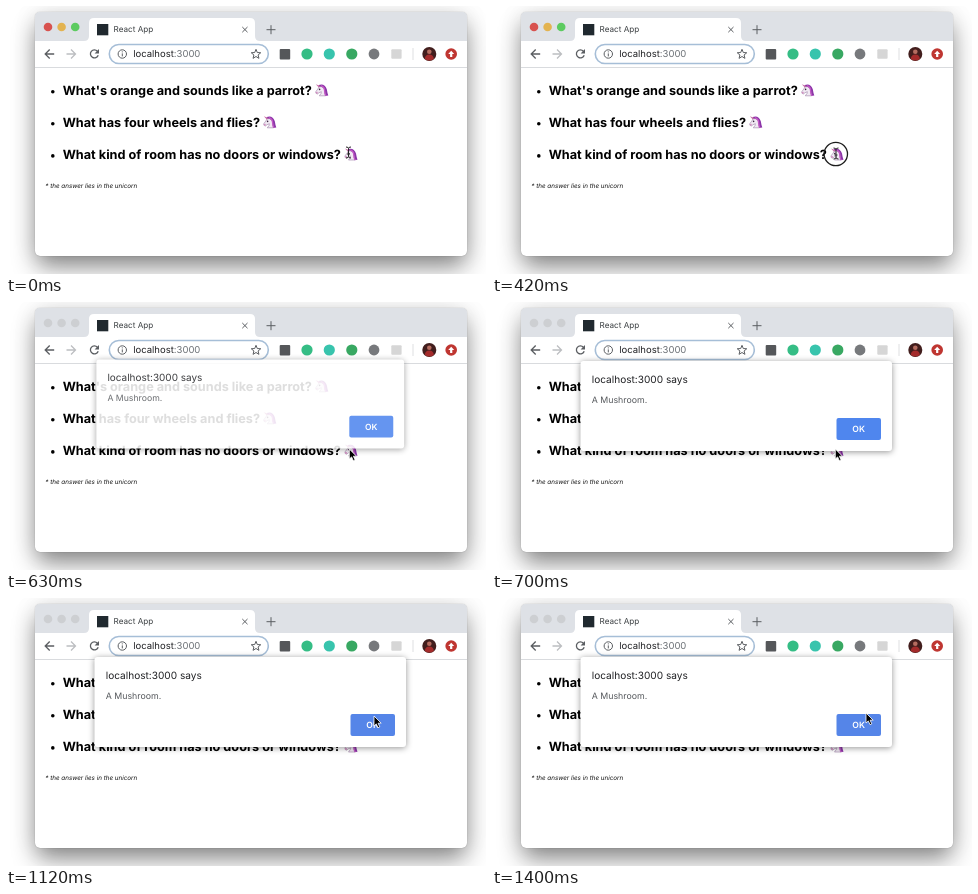
These frames come from a looping animation (480 px wide and 268 px high, 1470 ms). An HTML page:

```html
<!DOCTYPE html>
<html lang="en">
<head>
<meta charset="utf-8">
<title>Riddles</title>
<style>
  html, body { margin: 0; width: 100%; height: 100%; overflow: hidden; background: #fff; }
  #window {
    position: absolute; left: 29px; top: 6px; width: 432px; height: 244px;
    border-radius: 5px; background: #fff;
    box-shadow: 0 0 1px rgba(0,0,0,.4), 0 12px 24px -2px rgba(0,0,0,.48), 0 0 24px rgba(0,0,0,.08);
  }
  svg { position: absolute; left: 0; top: 0; width: 480px; height: 268px; display: block; }
  text { font-family: Inter, "Liberation Sans", sans-serif; text-rendering: geometricPrecision; white-space: pre; }
  .question { font-size: 12.7px; font-weight: 700; fill: #000; }
  .line { fill: none; stroke: #5b5e62; stroke-width: 1.3; }
  .thin { stroke-width: 1; }
  #dialog rect.panel { filter: drop-shadow(0 1.5px 3px rgba(0,0,0,.42)); }
</style>
</head>
<body>
<div id="window"></div>
<svg viewBox="0 0 480 268">
  <defs>
    <g id="unicorn">
      <path d="M-3-5.3Q3-7 5-1Q5.6 3 6.5 5.3L3 5.8Q3-1-3-3Z" fill="#8b35a8"/>
      <path d="M-2.5-3.5Q2-4 2.8 0Q3.5 3 3.5 5.6H-2.5Q0 3-.5 1.5Q-3 2.3-4.5 3.8Q-6.5 3.5-6 1.5Q-4-1-2.5-3.5Z" fill="#f1eaf3" stroke="#9a7fa4" stroke-width=".6"/>
      <path d="M-.8-4.5Q3-3 2.8 1Q2.6 4 4.5 5.6" fill="none" stroke="#c456c6" stroke-width="1.3"/>
      <path d="M-6-6L-1.5-4.2L-3-2.6Z" fill="#c56aa5"/>
      <path d="M-6.2 1.8L-4.2 1.6L-4.2 3.6Q-6.2 3.8-6.2 1.8Z" fill="#d28fc0"/>
      <circle cx="-2.2" cy="-.8" r=".8" fill="#3a2441"/>
    </g>
  </defs>

  <!-- Tab strip -->
  <path d="M29 35V11Q29 6 34 6H456Q461 6 461 11V35Z" fill="#dee1e6"/>
  <path d="M78 35Q83 35 83 30V17Q83 12 88 12H244Q249 12 249 17V30Q249 35 254 35Z" fill="#fff"/>
  <g id="lights">
    <circle cx="42" cy="21" r="4.3"/>
    <circle cx="55.6" cy="21" r="4.3"/>
    <circle cx="69.2" cy="21" r="4.3"/>
  </g>
  <rect x="91" y="18" width="11.3" height="11.3" fill="#20292f"/>
  <text x="107.6" y="26.4" font-size="8.15" fill="#3c4043">React App</text>
  <path class="line thin" d="M236.3 21l5.2 5.2m0-5.2l-5.2 5.2M260.5 23.7h9m-4.5-4.5v9"/>

  <!-- Toolbar -->
  <path d="M29 61.5H461" stroke="#d9dbde"/>
  <path class="line" d="M48.2 48H39.2M43.7 43.5L39.2 48L43.7 52.5"/>
  <path class="line" style="stroke:#bcbec1" d="M60.5 48H69.5M65 43.5L69.5 48L65 52.5"/>
  <path class="line" d="M91.4 45.2A4 4 0 1 0 92.2 49.2"/>
  <path d="M93 43V47.4H88.6Z" fill="#5b5e62"/>
  <rect x="103.3" y="38.5" width="159" height="19" rx="9.5" fill="#fff" stroke="#a6bed7" stroke-width="1.6"/>
  <circle class="line thin" cx="116.3" cy="48" r="4.2"/>
  <path class="line thin" d="M116.3 47.4V50.4M116.3 45.4V46.4"/>
  <text x="127.2" y="51.3" font-size="9.5" fill="#202124">localhost<tspan fill="#6b7075">:3000</tspan></text>
  <path id="star" class="line thin"/>
  <rect x="273.7" y="43" width="10.5" height="10.5" rx="1" fill="#55575a"/>
  <circle cx="301" cy="48" r="5.6" fill="#35bd85"/>
  <circle cx="323.3" cy="48" r="5.6" fill="#38c4ad"/>
  <circle cx="345.8" cy="48" r="5.6" fill="#38a862"/>
  <circle cx="368" cy="48" r="5.4" fill="#77797c"/>
  <rect x="385.3" y="43.3" width="10.3" height="9.5" rx="1" fill="#d6d6d6"/>
  <path d="M407 42V54" stroke="#dedfe1"/>
  <g>
    <circle cx="423.3" cy="48" r="7" fill="#421e1d"/>
    <circle cx="423.3" cy="45.8" r="2.3" fill="#b56d60"/>
    <path d="M418.8 53Q419 48.5 423.3 48.5T427.8 53Q423.3 56 418.8 53Z" fill="#a42b2b"/>
  </g>
  <circle cx="445.2" cy="48" r="5.8" fill="#bf3631"/>
  <path d="M445.2 44.7L448.2 48H446.3V51H444.1V48H442.2Z" fill="#fff"/>

  <!-- Page -->
  <g id="questions"></g>
  <text x="39.3" y="182" font-size="6.27" font-style="italic" fill="#111">* the answer lies in the unicorn</text>

  <g id="dialog">
    <rect class="panel" x="88.5" y="59" width="311.5" height="90" rx="3" fill="#fff"/>
    <text x="99.7" y="81" font-size="10.1" fill="#202124">localhost:3000 says</text>
    <text x="99.7" y="101.2" font-size="8.8" fill="#55585c">A Mushroom.</text>
    <rect id="ok" x="344.5" y="116" width="44.5" height="22" rx="2"/>
    <text x="366.7" y="130.1" font-size="8.6" font-weight="600" text-anchor="middle" fill="#fff">OK</text>
  </g>

  <!-- Pointer -->
  <circle id="ring" cx="343.8" cy="148" r="11.7" fill="none" stroke="#1c1c1c" stroke-width="1.3"/>
  <g id="beam" fill="none">
    <path id="caret" d="M-2.5-5.5Q0-5.5 0-4V4Q0 5.5-2.5 5.5M2.5-5.5Q0-5.5 0-4M0 4Q0 5.5 2.5 5.5M-1.5 1.5H1.5" stroke-width="1"/>
    <use href="#caret" stroke="#222"/>
  </g>
  <path id="arrow" d="M0 0V10L2.3 7.9L4 11.7L5.8 10.9L4.1 7.2H7.2Z" fill="#000" stroke="#fff" stroke-width=".8"/>
</svg>
<script>
  const LOOP = 1470, STEP = 70;
  const $ = id => document.getElementById(id);
  const show = (id, on) => $(id).setAttribute("visibility", on ? "visible" : "hidden");
  const place = (id, [x, y]) => $(id).setAttribute("transform", `translate(${x} ${y})`);

  const questions = [
    ["What's orange and sounds like a parrot?", 89, 315.8],
    ["What has four wheels and flies?", 121, 263.8],
    ["What kind of room has no doors or windows?", 153.2, 345]
  ];
  $("questions").innerHTML = questions.map(([words, y, x]) => `
    <circle cx="46.8" cy="${y - 3.3}" r="1.8"/>
    <text class="question" x="56.7" y="${y}">${words}</text>
    <use href="#unicorn" x="${x}" y="${y - 4.8}"/>`).join("");

  const starPoints = Array.from({ length: 10 }, (_, i) => {
    const r = i % 2 ? 2.2 : 5, a = i * Math.PI / 5;
    return `${250 + r * Math.sin(a)} ${48.3 - r * Math.cos(a)}`;
  });
  $("star").setAttribute("d", `M${starPoints.join("L")}Z`);

  // Time, x, y of the pointer
  const path = [
    [0, 342.5, 146.5], [350, 344, 147.5], [490, 344, 147.5],
    [560, 343.3, 147], [910, 343.3, 147], [980, 346, 144],
    [1050, 358, 129], [1120, 368, 118], [1190, 371, 116.3],
    [1260, 373, 115.3], [1400, 374, 115]
  ];
  function pointerAt(t) {
    const next = path.findIndex(p => p[0] > t);
    if (next < 0) return path[path.length - 1].slice(1);
    const a = path[next - 1], b = path[next], k = (t - a[0]) / (b[0] - a[0]);
    return [1, 2].map(i => a[i] + (b[i] - a[i]) * k);
  }

  // Time, opacity, scale, vertical shift of the opening dialog
  const opening = [[630, .87, .988, -2], [700, 1, 1, 0]];
  const lightColors = ["#d8524f", "#e3b350", "#5ccb60"];

  function draw(time) {
    const t = Math.floor((time % LOOP) / STEP) * STEP;
    const active = t < 560, open = t >= 630;
    [...$("lights").children].forEach((dot, i) =>
      dot.setAttribute("fill", active ? lightColors[i] : "#cdcfd2"));

    show("dialog", open);
    if (open) {
      const [, alpha, scale, dy] = opening.filter(s => s[0] <= t).pop();
      $("dialog").setAttribute("opacity", alpha);
      $("dialog").setAttribute("transform",
        `translate(244 ${104 + dy}) scale(${scale}) translate(-244 -104)`);
      $("ok").setAttribute("fill", t >= 1120 ? "#5585e8" : "#4f86ee");
    }

    show("ring", t >= 420 && t < 560);
    show("beam", active);
    show("arrow", !active);
    place(active ? "beam" : "arrow", pointerAt(t));
  }

  const start = performance.now();
  function tick() {
    draw(performance.now() - start);
    requestAnimationFrame(tick);
  }
  tick();
</script>
</body>
</html>
```
